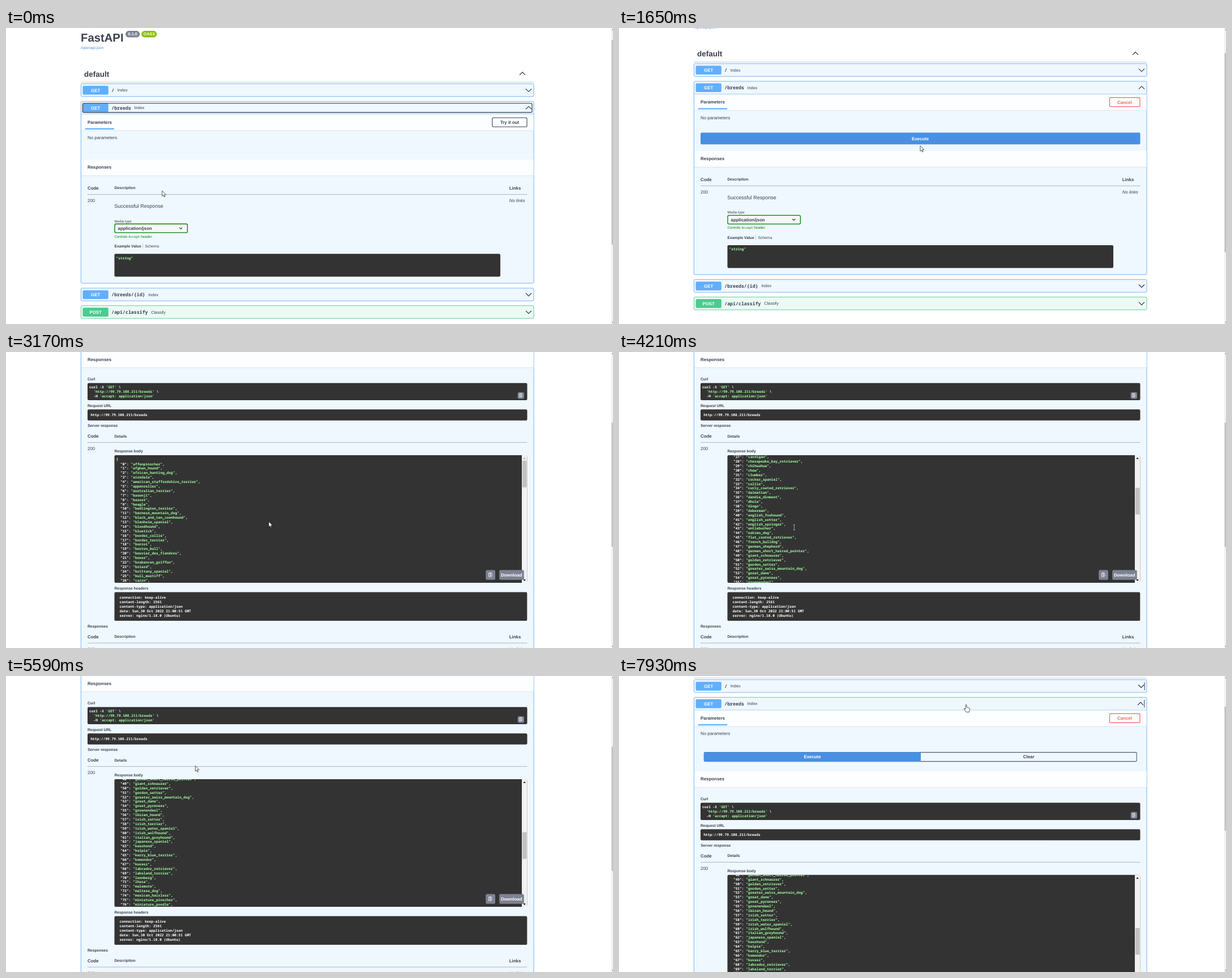
Recreate the animation shown at these times as an HTML page. Size 1072x522 px, loop 8 s.

```html
<!DOCTYPE html>
<html lang="en">
<head>
<meta charset="utf-8">
<title>API docs</title>
<style>
html, body { margin: 0; width: 100%; height: 100%; overflow: hidden; background: #fff; }
svg { display: block; }
text { font-family: "Liberation Sans", Arial, sans-serif; fill: #3b4151; white-space: pre; text-rendering: geometricPrecision; }
.mono { font-family: "Noto Sans Mono", "Liberation Mono", monospace; }
.b { font-weight: 700; }
.i { font-style: italic; }
.mid { text-anchor: middle; }
.w { fill: #fff; }
.g { fill: #a2fca2; }
.ok { fill: #008000; }
.red { fill: #ff6060; }
.link { fill: #4990e2; }
.line { fill: none; stroke: #2b303c; stroke-width: 1.15; }
</style>
</head>
<body>
<svg id="stage" width="1072" height="522" viewBox="0 0 1072 522"></svg>
<script>
const LOOP = 8000, NOTCH = 56.3, PITCH = 7.887;
const BLUE = '#61affe', GREEN = '#49cc90', DARK = '#333', GREY = '#7d8293';
// text sizes
const XS = 6.2, S = 6.76, M = 7.88, L = 9.01, MONO = 6.195;

const breeds = `affenpinscher afghan_hound african_hunting_dog airedale american_staffordshire_terrier
appenzeller australian_terrier basenji basset beagle bedlington_terrier bernese_mountain_dog
black_and_tan_coonhound blenheim_spaniel bloodhound bluetick border_collie border_terrier borzoi
boston_bull bouvier_des_flandres boxer brabancon_griffon briard brittany_spaniel bull_mastiff cairn
cardigan chesapeake_bay_retriever chihuahua chow clumber cocker_spaniel collie curly_coated_retriever
dalmatian dandie_dinmont dhole dingo doberman english_foxhound english_setter english_springer
entlebucher eskimo_dog flat_coated_retriever french_bulldog german_shepherd
german_short_haired_pointer giant_schnauzer golden_retriever gordon_setter
greater_swiss_mountain_dog great_dane great_pyrenees groenendael ibizan_hound irish_setter
irish_terrier irish_water_spaniel irish_wolfhound italian_greyhound japanese_spaniel keeshond kelpie
kerry_blue_terrier komondor kuvasz labrador_retriever lakeland_terrier leonberg lhasa malamute
maltese_dog mexican_hairless miniature_pinscher miniature_poodle miniature_schnauzer newfoundland
norfolk_terrier norwegian_elkhound norwich_terrier old_english_sheepdog otterhound papillon pekinese`.split(/\s+/);

// y is the middle of the capitals
const text = (x, y, s, size, cls = '') =>
  `<text x="${x}" y="${y + size * 0.36}" font-size="${size}" class="${cls}">${s}</text>`;
const rect = (x, y, x2, y2, fill, more = '') =>
  `<rect x="${x}" y="${y}" width="${x2 - x}" height="${y2 - y}" fill="${fill}" ${more}/>`;
const round = (x, y, x2, y2, fill, more = '') => rect(x, y, x2, y2, fill, `rx="2.2" ${more}`);
const group = (id, body, more = '') => `<g id="${id}" ${more}>${body}</g>`;
// ~marked~ parts are string literals
const code = (x, y, s) => text(x, y, s.replace(/~(.*?)~/g, '<tspan class="g">$1</tspan>'), MONO, 'mono b w');
const chevron = (x, y, up, w = 5, id = '') =>
  `<path id="${id}" class="line" d="M${x - w} ${y + (up ? w / 2 : -w / 2)}l${w} ${up ? -w : w}l${w} ${up ? w : -w}"/>`;
const rule = y => rect(144, y - 0.4, 920.5, y + 0.4, '#3b4151', 'opacity=".45"');
const strip = (y, y2) =>
  rect(133, y, 931.7, y2, '#fff', 'opacity=".85"') + rect(133, y2 - 0.2, 931.7, y2 + 0.8, '#000', 'opacity=".09"');

function frame(y, y2, color, id = '') {
  return round(132.5, y, 932, y2, 'none', `class="${id}" stroke="#000" stroke-width="2.2" opacity=".06"`) +
    round(132.5, y, 932, y2, '#fff', `class="${id}"`) +
    round(132.5, y, 932, y2, color, `class="${id}" fill-opacity=".1" stroke="${color}" stroke-width=".8"`);
}

function summary(y, method, path, note, color, up, id) {
  return round(135.5, y - 7.8, 180.8, y + 7.8, color) +
    text(158.2, y, method, M, 'b w mid') +
    text(186.2, y, path, 8.26, 'mono b') +
    text(186.2 + path.length * 4.955 + 5.6, y - 0.2, note, 7.32) +
    chevron(923, y, up, 5, id);
}

const row = (y, method, path, note, color, id) =>
  frame(y - 11.4, y + 11, color) + summary(y, method, path, note, color, false, id);

function copyIcon(x, y, s) {
  return `<g transform="translate(${x} ${y}) scale(${s})" fill="none" stroke="#fff" stroke-width=".9">
    <path d="M2.2 3.2H-3.2V-3.4H2.2V-1.4M-1.8-3.9H.8M-1.8-1.5H.8M4 .8H-.6M1-1L-.8.8L1 2.6"/></g>`;
}

const head =
  text(132, 16.5, 'FastAPI', 20.3, 'b') +
  rect(211, 5, 236.3, 16.6, '#7d8492', 'rx="5.8"') + text(223.7, 10.8, '0.1.0', 7.3, 'b w mid') +
  rect(239.2, 5, 266.3, 16.6, '#89bf04', 'rx="5.8"') + text(252.8, 10.8, 'OAS3', 7.3, 'b w mid') +
  text(132, 34.2, '/openapi.json', S, 'link') +
  text(138, 80.9, 'default', 13.5, 'b') + chevron(912, 80.3, true) +
  rect(132, 95.1, 932, 95.9, '#3b4151', 'opacity=".35"');

const openRow = frame(129.5, 450, BLUE, 'open') +
  summary(140.7, 'GET', '/breeds', 'Index', BLUE, true, 'chev2') +
  rect(132.5, 151.6, 932, 152.3, BLUE) + strip(152.3, 180.5) +
  text(144, 166.1, 'Parameters', M, 'b') + rect(139.8, 176.8, 191, 179, BLUE) +
  text(144, 193.2, 'No parameters', M);

const tryOut =
  round(135.4, 132.8, 929, 148.9, 'none', 'stroke="#2b3440" stroke-width="1.1"') +
  round(858.8, 158.3, 920, 174.2, 'none', 'stroke="#3b4151" stroke-width="1.1"') +
  text(889.5, 166.2, 'Try it out', M, 'b mid');

const cancel =
  round(866.5, 158.2, 920, 174.2, 'none', 'stroke="#ff6060" stroke-width="1.2"') +
  text(893, 166.2, 'Cancel', M, 'b mid red');

const execWide = round(144, 220, 920.5, 240.7, '#4990e2') + text(532, 230.5, 'Execute', M, 'b mid w');

const headers = ['connection: keep-alive', 'content-length: 2561', 'content-type: application/json',
  'date: Sun,30 Oct 2022 21:00:51 GMT', 'server: nginx/1.18.0 (Ubuntu)'];

const result =
  round(150.3, 226.4, 914.3, 242.4, 'none', 'stroke="#555b66" stroke-width="1.1"') +
  round(150, 226, 533, 242.8, '#4990e2', 'id="exec"') +
  text(341, 234.3, 'Execute', M, 'b mid w').replace('<text', '<text id="execT"') +
  text(723, 234.3, 'Clear', M, 'b mid').replace('<text', '<text id="clearT"') +
  text(144, 308.3, 'Curl', S, 'b') +
  round(144, 315.4, 920.5, 345.7, DARK) +
  code(147, 322.8, "curl -X ~'GET'~ \\") +
  code(147, 330.7, "  ~'http://99.79.108.211/breeds'~ \\") +
  code(147, 338.6, "  -H ~'accept: application/json'~") +
  round(903.7, 331.6, 915, 343.2, GREY) + copyIcon(909.3, 337.4, 0.85) +
  text(144, 355.3, 'Request URL', S, 'b') +
  round(144, 362, 920.5, 381.5, DARK) + code(149.4, 371.8, 'http://99.79.108.211/breeds') +
  text(144.3, 390.7, 'Server response', S, 'b') +
  text(144, 408.8, 'Code', M, 'b') + text(191.4, 408.8, 'Details', S, 'b') + rule(420.3) +
  text(144, 430.9, '200', M) + text(191.4, 435.6, 'Response body', S, 'b') +
  round(191.5, 442.6, 920.3, 667.7, DARK) +
  rect(911, 442.6, 920.3, 667.7, '#f1f1f1') +
  rect(912, 452.3, 919.5, 499.3, '#c1c1c1', 'id="listThumb"') +
  '<path id="upArrow" d="M913.3 449.2h4.6l-2.3-2.6z"/><path d="M913.3 662h4.6l-2.3 2.6z"/>' +
  '<clipPath id="view"><rect x="191.5" y="442.6" width="719.5" height="225.1"/></clipPath>' +
  '<g clip-path="url(#view)">' +
  group('list', code(194.5, 449.9, '{') +
    breeds.map((b, i) => code(194.5, 458 + i * PITCH, `  "${i}": ~"${b}"~,`)).join('')) + '</g>' +
  round(847.3, 645.2, 864, 662.4, GREY) + copyIcon(855.6, 653.8, 0.95) +
  round(871.2, 645.2, 914.8, 662.4, GREY) + text(892.7, 653.8, 'Download', M, 'b w mid') +
  text(191.4, 677, 'Response headers', S, 'b') +
  round(191.5, 684.2, 920.3, 734.8, DARK) +
  headers.map((h, i) => code(200.6, 693.7 + i * PITCH, h)).join('') +
  text(144, 744.2, 'Responses', S, 'b');

const table =
  text(144, 282.2, 'Code', M, 'b') + text(191.4, 282, 'Description', S, 'b') + text(888.8, 282.2, 'Links', M, 'b') +
  rule(293.5) +
  text(144, 304.2, '200', M) + text(888.8, 304.2, 'No links', M, 'i') +
  text(191.3, 313.6, 'Successful Response', L) +
  text(191.4, 340.4, 'Media type', XS) +
  round(192, 345.5, 320.4, 360.9, '#f7f7f7', 'stroke="#008000" stroke-width="1.3"') +
  text(197.6, 353.2, 'application/json', M, 'b') + chevron(308.8, 353.2, false, 2.5) +
  text(191.4, 367.4, 'Controls <tspan class="mono" font-size="5.68">Accept</tspan> header.', XS, 'ok') +
  text(191.4, 384.5, 'Example Value', S, 'b') + rect(241.4, 380.2, 242, 388.8, '#3b4151', 'opacity=".4"') +
  text(245.4, 384.5, 'Schema', S) +
  round(191.5, 398.2, 873, 438.5, DARK) + code(194.5, 405.4, '~"string"~') +
  row(470.2, 'GET', '/breeds/{id}', 'Index', BLUE, 'chev3') +
  row(501.1, 'POST', '/api/classify', 'Classify', GREEN, 'chev4');

const hoverLine = (id, y) => rect(927.9, y - 7, 928.9, y + 7, '#3b4151', `id="${id}"`);

const cursors =
  group('arrow', '<path d="M0 0V9.6L2.2 7.5L3.6 10.9L5.1 10.3L3.7 7H6.8Z"/>') +
  group('hand', '<path d="M-1 1Q0-.8 1 1V5L5 6Q6.6 6.4 6.6 8L5.6 11.5V13.4H0L-3.2 8.6Q-4 7.2-3 6.8Q-2.2 6.8-1 8.2Z"/>') +
  group('beam', '<path fill="none" stroke="#ddd" d="M-1.7-4.5H1.7M0-4.5V4.5M-1.7 4.5H1.7"/>');

document.getElementById('stage').innerHTML =
  group('page', head + row(109.8, 'GET', '/', 'Index', BLUE, 'chev1') + openRow +
    group('tryOut', tryOut) + group('cancel', cancel) + group('execWide', execWide) +
    group('strip', strip(232, 260.3) + text(144, 245.6, 'Responses', M, 'b')) +
    group('table', table) + group('result', result) + hoverLine('line1', 109.8) + hoverLine('line2', 140.7)) +
  rect(1069, 0, 1072, 522, '#f1f1f1') + rect(1069.4, 0, 1072, 10, '#c1c1c1', 'id="thumb"') +
  '<path fill="#505050" d="M1070 3.4h2v-2zM1070 518.6h2v2z"/>' +
  group('cursor', cursors, 'fill="#fff" stroke="#000" stroke-width=".65" stroke-linejoin="round"');

const $ = {};
document.querySelectorAll('[id]').forEach(e => $[e.id] = e);
const frames = document.querySelectorAll('.open');

const SCROLL = [[0, 20.8], [75, 32], [190, 56.3], [2640, 56.3], [3110, 5 * NOTCH],
  [5850, 5 * NOTCH], [6050, 114.2], [6080, 114.2], [6150, 2 * NOTCH]];
const LIST = [[3370, 0], [4110, 4], [4200, 4], [4760, 8], [5030, 8], [5180, 7]];
const MOUSE = [[0, 275.8, 287], [75, 275.8, 287], [800, 860, 138], [1000, 890, 130], [1150, 890, 131],
  [1640, 532, 207.7], [1720, 532, 207.7], [2000, 540, 196], [2330, 545, 197], [2540, 573, 248.2],
  [2980, 464, 299], [3300, 464, 299], [3750, 370, 405], [4150, 310, 310], [4600, 293.5, 289.5], [5180, 293.5, 289.5],
  [5800, 350, 108], [6060, 378.6, 65], [6630, 603, 50], [6900, 604, 52], [7250, 606, 17],
  [7620, 612, 19], [7925, 613, 50.3]];
const HOVER1 = [[7100, 0], [7300, 2.5], [7750, 2.5], [8000, 0.5]];
const HOVER2 = [[6350, 0], [6600, 2.5], [7150, 2.5], [7400, 0], [7780, 0], [7930, 2]];
const POINTER = [[0, 'arrow'], [860, 'hand'], [1200, 'arrow'], [1850, 'hand'], [2400, 'arrow'],
  [4150, 'beam'], [5200, 'arrow'], [6250, 'hand']];
const STATES = [
  { from: 0, ratio: 0.6916, strip: 0, table: 0 },
  { from: 1090, ratio: 0.6724, strip: 20.3, table: 20.3 },
  { from: 2310, ratio: 0.4195, strip: 27.8, table: 480.4 }
];

const smooth = p => p * p * (3 - 2 * p);

function at(keys, t, col = 1) {
  const k = keys.findIndex(r => r[0] > t);
  if (k < 0) return keys[keys.length - 1][col];
  if (k === 0) return keys[0][col];
  const a = keys[k - 1], b = keys[k];
  return a[col] + (b[col] - a[col]) * smooth((t - a[0]) / (b[0] - a[0]));
}

const move = (e, x, y) => e.setAttribute('transform', `translate(${x} ${y})`);
const show = (e, on) => e.style.display = on ? '' : 'none';

function hover(chev, line, s) {
  move(chev, -s, 0);
  move(line, -0.3 * s, 0);
  show(line, s > 0.1);
}

function draw(t) {
  const n = STATES.filter(s => s.from <= t).length - 1, st = STATES[n];
  const scroll = at(SCROLL, t);
  move($.page, 0, 20.8 - scroll);
  show($.tryOut, n === 0);
  show($.cancel, n > 0);
  show($.execWide, n === 1);
  show($.result, n === 2);
  move($.strip, 0, st.strip);
  move($.table, 0, st.table);
  frames.forEach(f => f.setAttribute('height', 320.5 + st.table));
  $.thumb.setAttribute('y', 6.5 + st.ratio * scroll);
  $.thumb.setAttribute('height', 522 * st.ratio);

  const p = Math.min(1, Math.max(0, (t - 2310) / 300)), grow = 1 - (1 - p) ** 2;
  const w = 80 + 606 * grow / (1 + grow);
  $.exec.setAttribute('width', w);
  $.execT.setAttribute('x', 150 + w / 2);
  $.clearT.setAttribute('x', (150 + w + 914.3) / 2);

  const off = at(LIST, t) * NOTCH;
  move($.list, 0, -off);
  move($.listThumb, 0, off * 0.213);
  $.upArrow.setAttribute('fill', off > 0 ? '#000' : '#a3a3a3');

  hover($.chev1, $.line1, at(HOVER1, t));
  hover($.chev2, $.line2, at(HOVER2, t));

  const kind = POINTER.filter(r => r[0] <= t).pop()[1];
  ['arrow', 'hand', 'beam'].forEach(k => show($[k], k === kind));
  move($.cursor, at(MOUSE, t, 1), at(MOUSE, t, 2));
}

const STEP = 69.05, PHASE = 51;
const snap = t => t < PHASE ? 0 : PHASE + 10 + STEP * Math.floor((t - PHASE) / STEP);

const start = performance.now();
function tick() {
  draw(snap((performance.now() - start) % LOOP));
  requestAnimationFrame(tick);
}
tick();
</script>
</body>
</html>
```
